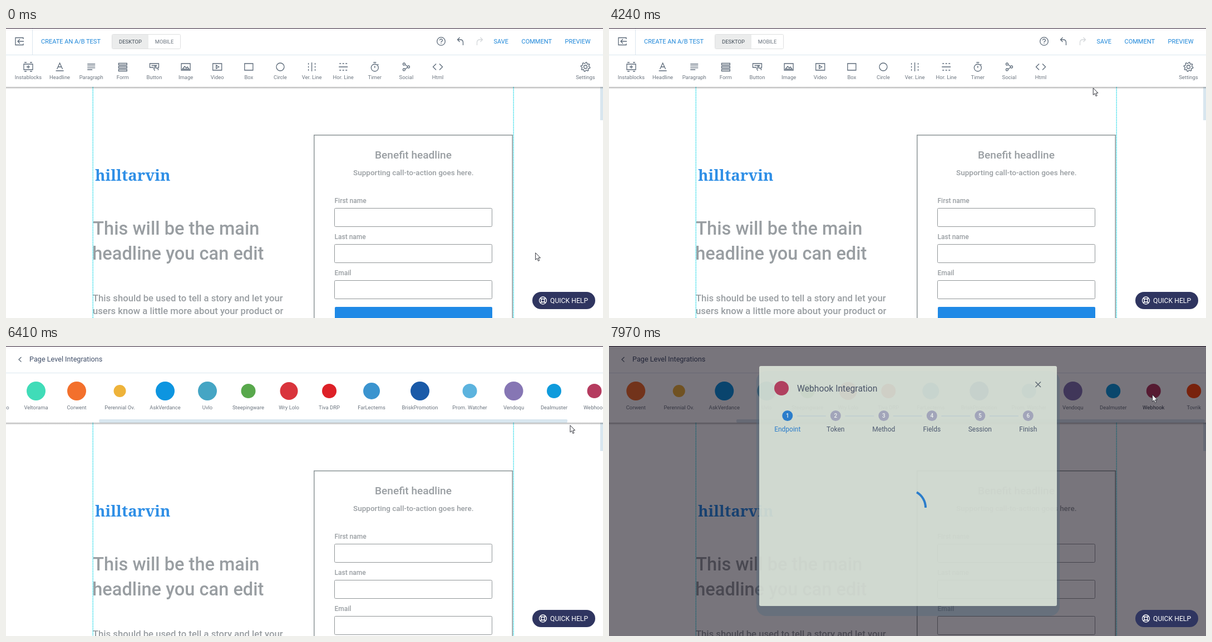
Recreate the animation shown at these times as an HTML page. Size 1073 by 522 pixels, loop 8000 ms.

```html
<!DOCTYPE html>
<html lang="en">
<head>
<meta charset="utf-8">
<title>Page builder</title>
<style>
html, body { margin: 0; width: 100%; height: 100%; overflow: hidden; background: #fff; }
svg { display: block; width: 100vw; height: 100vh; font-family: Roboto, sans-serif; }
.icon { fill: none; stroke: #5c6a79; stroke-width: 1.3; }
.label { font-size: 9.45px; fill: #6d7680; text-anchor: middle; }
.link { font-size: 11px; fill: #1c86d9; }
.copy { font-weight: 500; fill: #999ea2; }
.field { fill: #fff; stroke: #909597; }
.mid { text-anchor: middle; }
</style>
</head>
<body>
<svg viewBox="0 0 1073 522" xmlns="http://www.w3.org/2000/svg">
  <defs>
    <clipPath id="panelClip"><rect y="49" width="1073" height="89"/></clipPath>
    <linearGradient id="shade" x2="0" y2="1">
      <stop stop-color="#000" stop-opacity=".3"/><stop offset="1" stop-color="#000" stop-opacity="0"/>
    </linearGradient>
  </defs>
  <rect width="1073" height="522" fill="#fff"/>

  <g id="page">
    <path d="M156.25 106V522M912.25 106V522" stroke="#45dfec" stroke-width="1.5" stroke-dasharray="2 1"/>
    <text x="160" y="275" font-family="Noto Serif, serif" font-weight="700" font-size="27.8" fill="#2f8fe6">hilltarvin</text>
    <g class="copy">
      <g font-size="32.55"><text x="156.3" y="372">This will be the main</text><text x="155.3" y="417">headline you can edit</text></g>
      <g font-size="16.65"><text x="156" y="492">This should be used to tell a story and let your</text><text x="156" y="515">users know a little more about your product or</text></g>
    </g>
    <rect x="553.75" y="192.75" width="356.5" height="400" fill="#fff" stroke="#8b9496" stroke-width="1.5"/>
    <g class="copy">
      <text class="mid" x="732" y="235" font-size="19.1">Benefit headline</text>
      <text class="mid" x="732.3" y="265" font-size="13.5">Supporting call-to-action goes here.</text>
    </g>
    <g id="fields" class="copy" font-size="12"></g>
    <rect x="591" y="502" width="283" height="40" rx="2" fill="#1f89e6"/>
  </g>
  <rect id="vbar" x="1068" width="5" fill="#d8e6ef"/>

  <g id="builder">
    <rect width="1073" height="106" fill="#fff"/>
    <rect y="106" width="1073" height="4" fill="url(#shade)"/>
    <path d="M0 48.5H1073M47.5 0V48" stroke="#dae6ee"/>
    <g class="icon">
      <path d="M31 20V17.5H17V30.5H31V28M32 24H21M25 20L21 24L25 28"/>
      <circle cx="782" cy="24" r="7.3"/>
      <path d="M779.6 22.3Q779.8 19.8 782 19.8T784.4 22.2Q784.4 23.4 782 25.2V26M782 27.3V28.6"/>
      <path d="M815.5 17L811.5 21L815.5 25M812 21H816.5Q821.5 21 821.5 26V31"/>
      <path d="M852.5 17L856.5 21L852.5 25M856 21H851.5Q846.5 21 846.5 26V31" stroke="#d3d7da"/>
    </g>
    <rect x="190.5" y="11.5" width="123" height="26" rx="2" fill="#fff" stroke="#dedfe0"/>
    <rect x="191" y="12" width="65" height="25" fill="#ebecec"/>
    <g class="link">
      <text x="63" y="28">CREATE AN A/B TEST</text><text x="876.5" y="28">SAVE</text>
      <text x="926.5" y="28">COMMENT</text><text x="1004.5" y="28">PREVIEW</text>
    </g>
    <g class="label"><text x="223.5" y="27.5" fill="#3f4a55">DESKTOP</text><text x="284.5" y="27.5">MOBILE</text></g>
    <g id="tools"></g>
  </g>

  <g id="integrations">
    <rect width="1073" height="138" fill="#fff"/>
    <rect y="138" width="1073" height="4" fill="url(#shade)"/>
    <path d="M0 48.5H1073" stroke="#dae6ee"/>
    <path d="M27.5 20L23 24.3L27.5 28.6" class="icon"/>
    <text x="42" y="28" font-size="12.65" fill="#42506a">Page Level Integrations</text>
    <g id="panel" clip-path="url(#panelClip)">
      <g id="items"></g>
      <rect id="thumb" y="132" width="842" height="6" rx="2" fill="#d8e6ef"/>
    </g>
  </g>
  <rect width="1073" height="1" fill="#2c1b30"/>

  <rect id="overlay" width="1073" height="522" fill="#07000e"/>
  <g id="modal">
    <rect id="halo" x="265" y="45" width="545" height="441" rx="18" fill="#4f6a7c"/>
    <rect id="sheet" x="270" y="36" width="535" height="432" rx="3" fill="#e6eee1"/>
    <g id="content">
      <circle cx="310" cy="76" r="13" fill="#b0405f"/>
      <text x="338" y="81.5" font-size="15.7" fill="#4b5569">Webhook Integration</text>
      <path d="M766.5 64.5L776 74M776 64.5L766.5 74" stroke="#5f6974" stroke-width="1.5"/>
      <g id="steps"></g>
    </g>
    <path id="spinner" fill="none" stroke="#2b7dcb" stroke-width="4"/>
  </g>

  <g id="help">
    <rect x="946" y="475" width="113" height="31" rx="15.5" fill="#2f3560"/>
    <g fill="none" stroke="#fff" stroke-width="1.3">
      <circle cx="965" cy="490.5" r="6.5"/><circle cx="965" cy="490.5" r="3"/>
      <path d="M960.4 485.9L962.9 488.4M967.1 492.6L969.6 495.1M969.6 485.9L967.1 488.4M962.9 492.6L960.4 495.1" stroke-width="2"/>
    </g>
    <text x="978" y="494.5" font-size="12.2" fill="#fff">QUICK HELP</text>
  </g>

  <g id="cursor" fill="#fff" stroke="#30323a" stroke-linejoin="round">
    <path id="arrow" d="M.7 .7V13.2L3.6 10.6L5.6 15.4L7.7 14.5L5.7 9.8H9.5Z"/>
    <path id="hand" d="M-1.2 1Q0-.6 1.2 1V6.2Q2.4 5.2 3.7 6.4Q5 5.6 6.1 7Q7.8 6.7 8 8.6V12L6.6 16.5H-.6L-5 10.8Q-4.6 8.6-2.6 10L-1.2 11.2Z"/>
  </g>
</svg>

<script>
const DURATION = 8000, OPEN = 4630, SLIDE = 452;
const $ = id => document.getElementById(id);
const set = (id, attrs) => { for (const k in attrs) $(id).setAttribute(k, attrs[k]); };
const label = (x, y, s) => `<text class="label" x="${x}" y="${y}">${s}</text>`;
const range = n => [...Array(n).keys()];

const gear = 'M' + range(32).map(i => {
  const r = i % 4 < 2 ? 8.3 : 6.2, a = (i + 0.5) * Math.PI / 16;
  return `${(r * Math.cos(a)).toFixed(1)} ${(r * Math.sin(a)).toFixed(1)}`;
}).join('L') + 'ZM-3 0A3 3 0 1 0 3 0A3 3 0 1 0-3 0Z';

const tools = [
  ['Instablocks', 'M-8-5H8V5H-8ZM0-3V3M-3 0H3M-7-8H-3M3-8H7M-7 8H-3M3 8H7'],
  ['Headline', 'M-5 4L0-7L5 4M-3.2 0H3.2M-7 7H7'],
  ['Paragraph', 'M-7-5H7M-7-1.7H7M-7 1.7H7M-7 5H2'],
  ['Form', 'M-7.5-6.5H7.5V-3.5H-7.5ZM-7.5-1H7.5V2H-7.5ZM-7.5 4.5H7.5V7.5H-7.5Z'],
  ['Button', 'M-1 1H-8V-6H8V1H6M-5-2.5H5M1 7L-1 3L1 2V-2H3V2L7 3V6'],
  ['Image', 'M-8-6H8V6H-8ZM-6 4L-2-1L1 2L3 0L6 4Z'],
  ['Video', 'M-8-6H8V6H-8ZM-2-3L3 0L-2 3Z'],
  ['Box', 'M-7.5-6H7.5V6H-7.5Z'],
  ['Circle', 'M-7 0A7 7 0 1 0 7 0A7 7 0 1 0-7 0'],
  ['Ver. Line', 'M0-8V8M-6-7V-4M-6-1.5V1.5M-6 4V7M6-7V-4M6-1.5V1.5M6 4V7'],
  ['Hor. Line', 'M-8 0H8M-7-6H-4M-1.5-6H1.5M4-6H7M-7 6H-4M-1.5 6H1.5M4 6H7'],
  ['Timer', 'M-6.5 1.5A6.5 6.5 0 1 0 6.5 1.5A6.5 6.5 0 1 0-6.5 1.5M-2.5-8H2.5M0-2V2M5-5L6.5-3.5'],
  ['Social', 'M-6-5A2 2 0 1 0-2-5A2 2 0 1 0-6-5M2 0A2 2 0 1 0 6 0A2 2 0 1 0 2 0M-6 5A2 2 0 1 0-2 5A2 2 0 1 0-6 5M-2-4L2-1M-2 4L2 1'],
  ['Html', 'M-3-5.5L-8.5 0L-3 5.5M3-5.5L8.5 0L3 5.5'],
  ['Settings', gear]
];
$('tools').innerHTML = tools.map(([name, d], i) => {
  const x = i < 14 ? 40 + 56.62 * i : 1041.5;
  return `<path class="icon" transform="translate(${x} 70)" d="${d}"/>` + label(x, 92, name);
}).join('');

// name, centre, colour, radius
const apps = [
  ['Perdant', 50, '#2f80c2', 15], ['Dorvelt Hub', 122.5, '#2d8acb', 13],
  ['NoteBadgo', 195, '#4a3c38', 15], ['Veltorama', 267, '#40dcb8', 17],
  ['Corwent', 340, '#f3702c', 17], ['Perennial Ov.', 417.5, '#eeb33a', 11],
  ['AskVerdance', 499, '#0d95e0', 17], ['Uvlo', 575, '#45a5c4', 17],
  ['Steepingware', 648.5, '#58a84c', 13], ['Wry Lolo', 721.5, '#d9343c', 16],
  ['Tiva DRP', 794, '#dd2027', 13], ['FarLecterns', 870, '#3b94cf', 15],
  ['BriskPromotion', 957, '#1a5aa8', 17], ['Prom. Watcher', 1046.5, '#5cb3de', 13],
  ['Vendoqu', 1125.5, '#8676b4', 17], ['Dealmuster', 1198, '#0f9bdc', 13],
  ['Webhook', 1270.5, '#b53b5f', 13], ['Tovrik', 1343, '#ff4a0c', 13]
];
$('items').innerHTML = apps.map(([name, x, color, r]) =>
  `<circle cx="${x}" cy="81" r="${r}" fill="${color}"/>` + label(x, 114, name)).join('');
const hovered = [...$('items').querySelectorAll('text')].find(e => e.textContent === 'Webhook');

$('fields').innerHTML = ['First name', 'Last name', 'Email'].map((name, i) => {
  const y = 324.5 + 65.2 * i;
  return `<text x="590.5" y="${y - 10}">${name}</text><rect class="field" x="590.5" y="${Math.floor(y) + 0.5}" width="283" height="33" rx="2"/>`;
}).join('');

$('steps').innerHTML = ['Endpoint', 'Token', 'Method', 'Fields', 'Session', 'Finish'].map((name, i) => {
  const x = 320.8 + 86.5 * i;
  return (i < 5 ? `<path d="M${x + 17} 126H${x + 69}" stroke="#b3c6d0"/>` : '') +
    `<circle cx="${x}" cy="125.5" r="9.5" fill="${i ? '#a2a5ba' : '#2b7dcb'}"/>
    <text class="mid" x="${x}" y="129" font-size="10" font-weight="500" fill="#eef2ee">${i + 1}</text>
    <text class="mid" x="${x}" y="153.5" font-size="12" fill="${i ? '#4d5970' : '#2b7dcb'}">${name}</text>`;
}).join('');

const linear = p => p;
const smooth = p => p * p * (3 - 2 * p);
const cursorPath = [
  [0, 951, 404], [490, 951, 404], [790, 980, 261], [1250, 980, 261], [1700, 901, 317],
  [1860, 901, 317], [2190, 1044, 75], [2420, 1044, 75], [2510, 1009, 71], [3760, 1009, 71],
  [4430, 836, 116], [4900, 836, 116], [5420, 817, 132], [5450, 817, 132], [5570, 818, 133], [5930, 818, 133]
];
const dragPath = [[5930, 818, 133], [6140, 924, 139], [6400, 1012, 142], [6710, 1049, 143]];
const exitPath = [[7090, 1049, 143], [7490, 976, 87]];
const thumbPath = [[5930, 0], [6140, 55], [6400, 165], [6710, 226], [6740, 226], [6830, 229]];
// overlay, sheet, content, offset, arc start, arc end
const modalPath = [
  [7790, 0, 0, 0, -30, -90, -89], [7850, .067, .06, .12, -26, -87, -82], [7970, .54, .83, 1, 0, -60, 0]
];

function track(rows, t, ease = linear) {
  if (t <= rows[0][0]) return rows[0].slice(1);
  const n = rows.findIndex(r => r[0] > t);
  if (n < 0) return rows[rows.length - 1].slice(1);
  const a = rows[n - 1], b = rows[n], p = ease((t - a[0]) / (b[0] - a[0]));
  return a.slice(1).map((v, i) => v + (b[i + 1] - v) * p);
}

function arc(cx, cy, r, from, to) {
  const at = deg => `${cx + r * Math.cos(deg * Math.PI / 180)} ${cy + r * Math.sin(deg * Math.PI / 180)}`;
  return `M${at(from)}A${r} ${r} 0 0 1 ${at(to)}`;
}

function draw(t) {
  const open = t >= OPEN;
  set('builder', { visibility: open ? 'hidden' : 'visible' });
  set('integrations', { visibility: open ? 'visible' : 'hidden' });
  set('page', { transform: `translate(0 ${open ? 32 : 0})` });
  set('vbar', { y: open ? 138 : 106, height: open ? 51 : 60 });

  const left = Math.max(0, 1 - (t - OPEN) / SLIDE);
  set('panel', { transform: `translate(${open ? -1073 * left ** 3 : 0} 0)` });
  const [thumb] = track(thumbPath, t);
  set('thumb', { x: thumb });
  set('items', { transform: `translate(${-thumb * 1.274} 0)` });
  hovered.style.fill = t > 7400 ? '#38424e' : '';

  const [shade, sheet, content, dy, from, to] = track(modalPath, t);
  set('overlay', { opacity: shade });
  set('modal', { transform: `translate(0 ${dy})`, visibility: t > 7790 ? 'visible' : 'hidden' });
  set('halo', { opacity: sheet * sheet * 0.6 });
  set('sheet', { opacity: sheet });
  set('content', { opacity: content });
  set('spinner', { d: arc(537, 291, 32, from, to), opacity: Math.min(1, content + 0.2) });

  const [x, y] = t < 5930 ? track(cursorPath, t, smooth)
    : t < 7090 ? track(dragPath, t) : track(exitPath, t, smooth);
  const pointing = t >= 4430 && t < 5100;
  set('cursor', { transform: `translate(${x} ${y})` });
  set('arrow', { visibility: pointing ? 'hidden' : 'visible' });
  set('hand', { visibility: pointing ? 'visible' : 'hidden' });
}

function frame() {
  draw(performance.now() % DURATION);
  requestAnimationFrame(frame);
}
frame();
</script>
</body>
</html>
```
